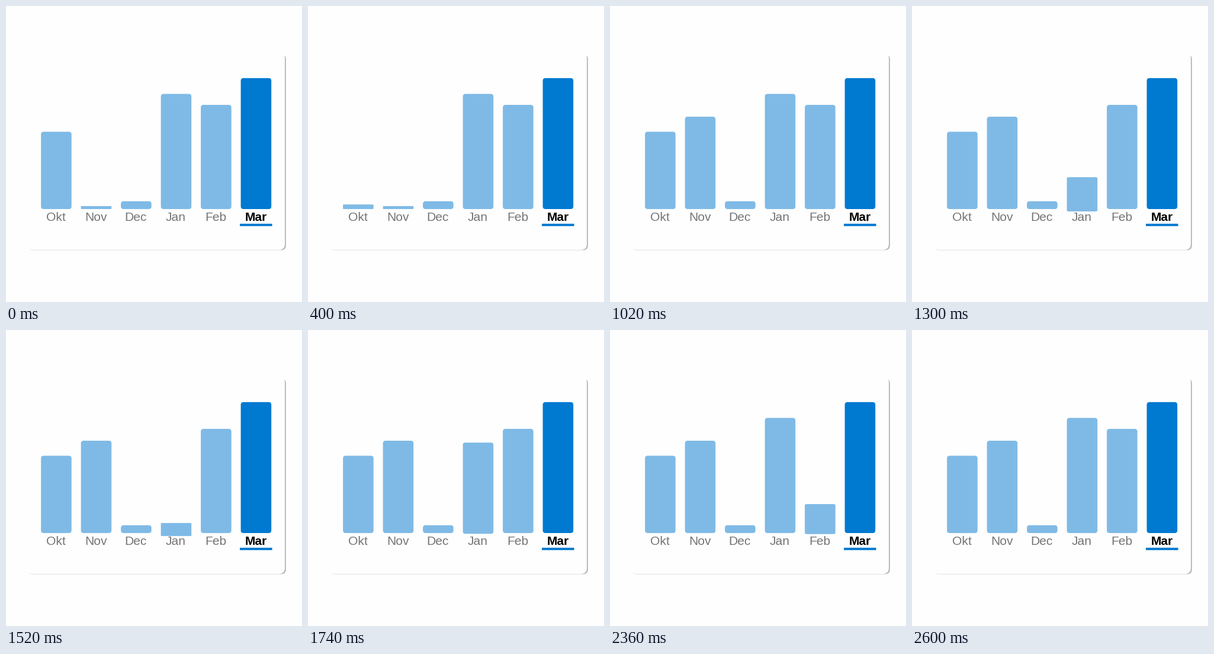
A matplotlib script for the animation above (2640 ms loop, 500 by 500 pixels).

```python
import matplotlib.pyplot as plt
from matplotlib.animation import FuncAnimation
from matplotlib.patches import PathPatch
from matplotlib.path import Path

SIZE, DPI = 500, 100
STEP, FRAMES = 20, 132
FIRST, PITCH, HALF_WIDTH = 84.9, 67.5, 25.8
BASE, RADIUS, LOW = 343, 4.5, .032
LIGHT, STRONG = "#7fbae6", "#0079d1"
GREY, PAGE = "#757575", "#fefefe"

LABELS = ["Okt", "Nov", "Dec", "Jan", "Feb", "Mar"]
HEIGHTS = [130.6, 156, 13.2, 194.5, 176, 221.2]
ACTIVE = "Mar"

# moment of the lowest point and time to or from full height, in ms
DIPS = {"Okt": (440, 400), "Nov": (527, 400),
        "Jan": (1445, 421), "Feb": (2236, 368)}
SINK = {"Jan": 5.7, "Feb": 2.4}  # how far the base drops when squashed


def round_rect(x0, y0, x1, y1, rx, ry):
    points = [(x0 + rx, y0), (x1 - rx, y0), (x1, y0), (x1, y0 + ry),
              (x1, y1 - ry), (x1, y1), (x1 - rx, y1),
              (x0 + rx, y1), (x0, y1), (x0, y1 - ry),
              (x0, y0 + ry), (x0, y0), (x0 + rx, y0), (x0 + rx, y0)]
    side = [Path.LINETO, Path.CURVE3, Path.CURVE3]
    return Path(points, [Path.MOVETO] + side * 4 + [Path.CLOSEPOLY])


def centre(k):
    return FIRST + PITCH * k


def scale_at(label, t):
    if label not in DIPS:
        return 1
    mid, half = DIPS[label]
    if label == "Nov":  # starts the loop already low and only rises
        t = max(t, mid)
    p = min(abs(t - mid) / half, 1)
    return LOW + (1 - LOW) * p * p * (3 - 2 * p)


def bar_path(k, t):
    s = scale_at(LABELS[k], t)
    bottom = BASE + SINK.get(LABELS[k], 0) * (1 - s)
    return round_rect(centre(k) - HALF_WIDTH, bottom - HEIGHTS[k] * s,
                      centre(k) + HALF_WIDTH, bottom, RADIUS, RADIUS * s)


fig = plt.figure(figsize=(SIZE / DPI, SIZE / DPI), dpi=DPI, facecolor=PAGE)
ax = fig.add_axes([0, 0, 1, 1])
ax.set_xlim(0, SIZE)
ax.set_ylim(SIZE, 0)
ax.axis("off")


def add(path, color):
    return ax.add_patch(PathPatch(path, facecolor=color, linewidth=0))


# card with a thin shadow, strongest on the right and in the lower corner
add(round_rect(38, 82, 472.9, 412.4, 8, 8), "#b8b8b8")
add(round_rect(36, 78, 471, 412, 10, 10), PAGE)

bars = []
for k, label in enumerate(LABELS):
    active = label == ACTIVE
    bars.append(add(bar_path(k, 0), STRONG if active else LIGHT))
    ax.text(centre(k) - .5, 363, label, ha="center", va="baseline",
            family="Liberation Sans", size=21 * 72 / DPI,
            weight="bold" if active else "normal",
            color="black" if active else GREY)

mark = centre(LABELS.index(ACTIVE))
add(round_rect(mark - 27.4, 367.8, mark + 27.2, 371.8, .5, .5), STRONG)


def draw(i):
    for k, bar in enumerate(bars):
        bar.set_path(bar_path(k, i * STEP))
    return bars


anim = FuncAnimation(fig, draw, frames=FRAMES, interval=STEP,
                     repeat=True, repeat_delay=0, blit=False)
plt.show()
```
